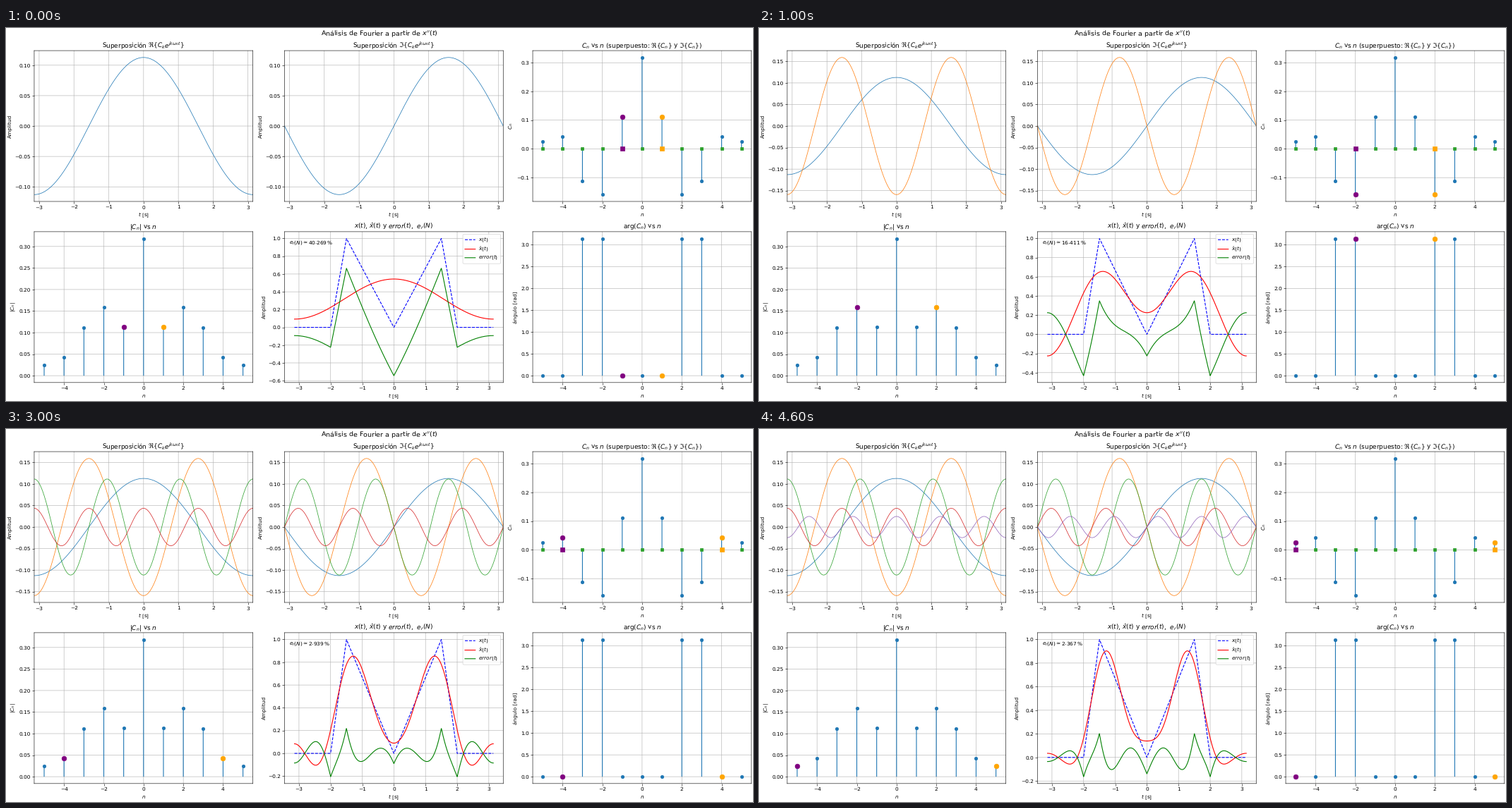
A matplotlib script for the animation above (5000 ms loop, 1058 by 529 pixels).

```python
import matplotlib.pyplot as plt
import numpy as np
from matplotlib.animation import FuncAnimation

HARMONICS = 5
t = np.linspace(-np.pi, np.pi, 2001)
n = np.arange(-HARMONICS, HARMONICS + 1)


def coefficient(k):
    """Fourier coefficient from the impulses of x''(t), with period 2 pi."""
    if k == 0:
        return 1 / np.pi
    impulses = 4 * np.cos(2 * k) - 16 / 3 * np.cos(1.5 * k) + 4 / 3
    return -impulses / (2 * np.pi * k**2)


C = np.array([coefficient(k) for k in n])
x = np.interp(np.abs(t), [0, 1.5, 2, np.pi], [0, 1, 0, 0])
power = 2 / (3 * np.pi)

# Unhinted text and unsnapped lines keep their proportions at a low dpi.
plt.rcParams.update({"text.hinting": "none", "path.snap": False})
fig, axes = plt.subplots(2, 3, figsize=(20, 10), dpi=100,
                         constrained_layout=True)
(ax_re, ax_im, ax_c), (ax_mag, ax_sum, ax_arg) = axes
fig.suptitle("Análisis de Fourier a partir de $x''(t)$", fontsize=13)


def label(ax, title, xlabel, ylabel):
    ax.set_title(title)
    ax.set_xlabel(xlabel)
    ax.set_ylabel(ylabel)
    ax.grid(True)


label(ax_re, r"Superposición $\Re\{C_k e^{jk\omega_0 t}\}$", "$t$ [s]", "Amplitud")
label(ax_im, r"Superposición $\Im\{C_k e^{jk\omega_0 t}\}$", "$t$ [s]", "Amplitud")
label(ax_c, r"$C_n$ vs $n$ (superpuesto: $\Re\{C_n\}$ y $\Im\{C_n\}$)", "$n$", "$C_n$")
label(ax_mag, "$|C_n|$ vs $n$", "$n$", "$|C_n|$")
label(ax_sum, r"$x(t)$, $\hat{x}(t)$ y $error(t)$,  $e_r(N)$", "$t$ [s]", "Amplitud")
label(ax_arg, r"$\arg(C_n)$ vs $n$", "$n$", "ángulo [rad]")


def highlights(ax, values, marker="o"):
    """Stem-head markers for -k and +k, with the values they follow."""
    pair = [ax.plot([], [], marker, color=color, ms=9, zorder=4)[0]
            for color in ("purple", "orange")]
    return pair, values


def stems(ax, values):
    ax.stem(n, values, linefmt="C0-", markerfmt="C0o", basefmt=" ")


magnitude, angle = np.abs(C), np.where(C < 0, np.pi, 0)
stems(ax_c, C)
ax_c.plot(n, 0 * n, "s", color="C2")
stems(ax_mag, magnitude)
stems(ax_arg, angle)
marked = [highlights(ax_c, C), highlights(ax_c, 0 * C, "s"),
          highlights(ax_mag, magnitude), highlights(ax_arg, angle)]

waves_re = [ax_re.plot([], [], lw=1)[0] for _ in range(HARMONICS)]
waves_im = [ax_im.plot([], [], lw=1)[0] for _ in range(HARMONICS)]
for ax in (ax_re, ax_im):
    ax.set_xlim(-np.pi, np.pi)

ax_sum.plot(t, x, "b--", label="$x(t)$")
estimate, = ax_sum.plot([], [], "r", label=r"$\hat{x}(t)$")
error, = ax_sum.plot([], [], "g", label="$error(t)$")
ax_sum.legend(loc="upper right", labelspacing=0.27, handletextpad=0.65)
error_text = ax_sum.text(0.02, 0.95, "", transform=ax_sum.transAxes, va="top")


def update(frame):
    order = frame + 1
    for k in range(1, HARMONICS + 1):
        c = C[HARMONICS + k]
        shown = k <= order
        waves_re[k - 1].set_data(*((t, c * np.cos(k * t)) if shown else ([], [])))
        waves_im[k - 1].set_data(*((t, c * np.sin(k * t)) if shown else ([], [])))

    for pair, values in marked:
        for line, k in zip(pair, (-order, order)):
            line.set_data([k], [values[HARMONICS + k]])

    used = np.abs(n) <= order
    x_hat = C[used] @ np.cos(np.outer(n[used], t))
    estimate.set_data(t, x_hat)
    error.set_data(t, x - x_hat)
    percent = 100 * (1 - np.sum(C[used] ** 2) / power)
    error_text.set_text(rf"$e_r(N)\approx {percent:.3f}\,\%$")

    for ax in (ax_re, ax_im, ax_sum):
        ax.relim()
        ax.autoscale_view()


# Solve the layout at full resolution, then freeze it for the 1058 x 529 stage.
update(0)
fig.draw_without_rendering()
fig.set_layout_engine("none")
fig.set_dpi(52.9)

animation = FuncAnimation(fig, update, frames=HARMONICS, init_func=lambda: None,
                          interval=1000, repeat=True, repeat_delay=0)
plt.show()
```
